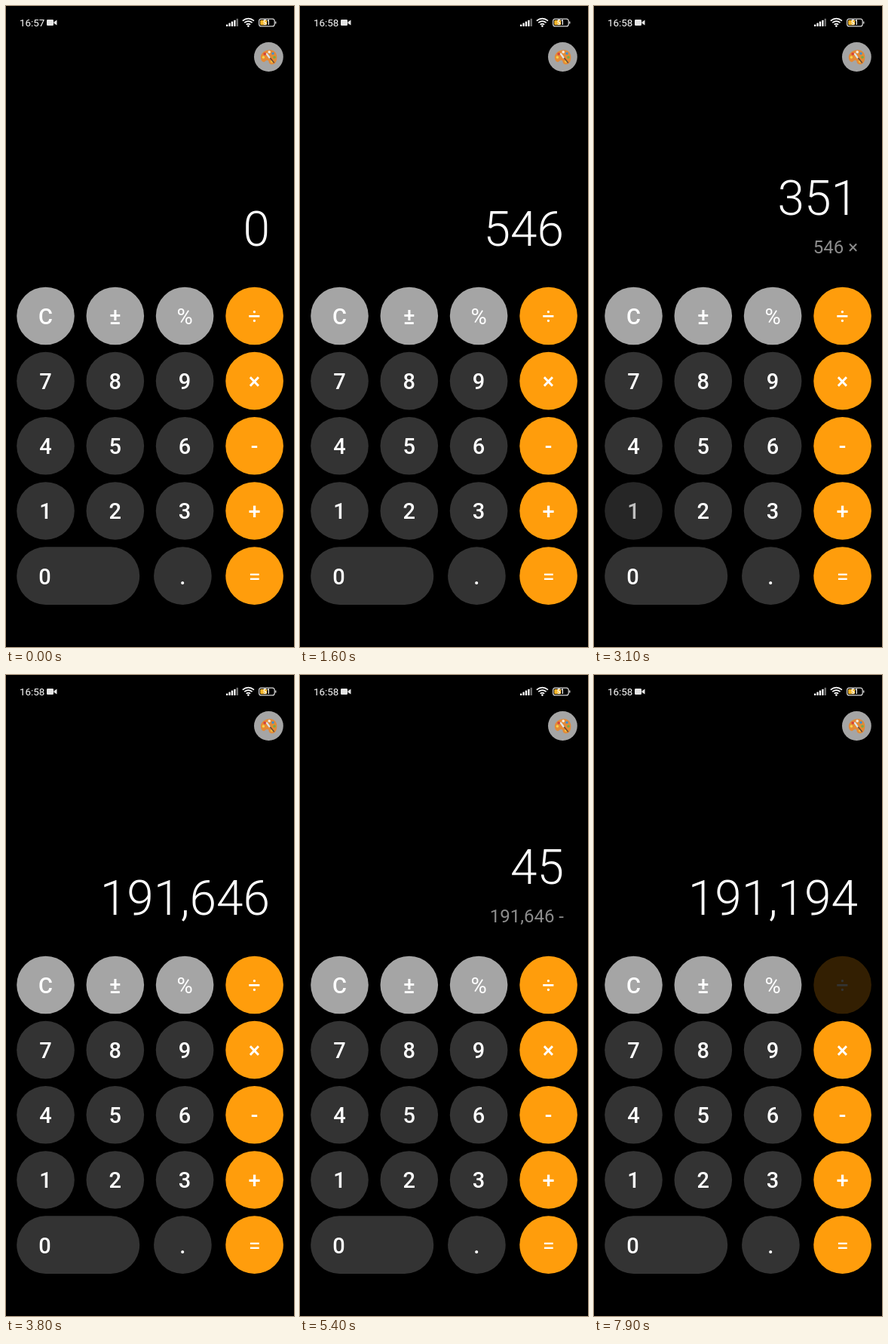
Recreate the animation shown at these times as an HTML page. Size 382x850 px, loop 8 s.

```html
<!DOCTYPE html>
<html lang="en">
<head>
<meta charset="utf-8">
<title>Calculator</title>
<style>
  html, body { margin: 0; width: 100%; height: 100%; overflow: hidden; background: #000; }
  svg { display: block; width: 100%; height: 100%; }
  text { font-family: Roboto, "Noto Sans", sans-serif; fill: #fff; }
  .key { font-size: 29px; font-weight: 500; text-anchor: middle; }
  .thin { font-weight: 400; }
  #main { font-size: 64px; font-weight: 300; text-anchor: end; }
  #sub { font-size: 24px; text-anchor: end; fill: #8c8c8c; }
</style>
</head>
<body>
<svg viewBox="0 0 382 850">
  <rect width="382" height="850" fill="#000"/>

  <text id="clock" x="18" y="27" font-size="13.4"></text>
  <g fill="#e4e4e4">
    <rect x="54" y="18" width="9" height="8" rx="1.2"/>
    <path d="M63.5 21.2 67.5 18.6V25.6L63.5 23Z"/>
  </g>
  <g id="signal" fill="#fff"></g>
  <g fill="none" stroke="#fff" stroke-width="1.7">
    <path d="M313.8 19.6Q321.4 13.6 329 19.6M316.2 22.2Q321.4 18.2 326.6 22.2M318.6 24.6Q321.4 22.6 324.2 24.6"/>
  </g>
  <circle cx="321.4" cy="26.6" r="1.3" fill="#fff"/>
  <rect x="335.6" y="17.1" width="20.6" height="9.8" rx="3" fill="none" stroke="#d8d8d8" stroke-width="1.2"/>
  <rect x="337.2" y="18.7" width="9" height="6.6" rx="1.4" fill="#f5b62b"/>
  <path d="M357.8 20.4V23.6" stroke="#d8d8d8" stroke-width="1.3"/>
  <text x="345.8" y="25" font-size="8.2" font-weight="700" text-anchor="middle">51</text>

  <circle cx="348.4" cy="67.5" r="19.4" fill="#a5a5a5"/>
  <g transform="translate(348.4 68)">
    <path fill="#e58a35" d="M-10.5 1C-11.5-6-3-11 4-9.5C10-8 12-2 10.5 4C9 9.5 4 10.5 1.5 8.5C-.5 7 1 4.5-1.5 4C-4 3.5-5 7-7.5 6C-9.5 5.2-10.2 3.2-10.5 1Z"/>
    <g id="paints"></g>
    <path d="M-2-4 7 7" stroke="#6b4b3c" stroke-width="1.6" stroke-linecap="round"/>
    <path d="M-2.4-4.4 1 .2" stroke="#dfe6ea" stroke-width="2.4" stroke-linecap="round"/>
  </g>

  <text id="main" x="350"></text>
  <text id="sub" x="350" y="328"></text>
  <g id="keys"></g>
</svg>
<script>
const LOOP = 8000, DIM = 0.2, FADE = 250;
const GREY = '#a5a5a5', DARK = '#333333', ORANGE = '#ff9d0c';
const $ = id => document.getElementById(id);

function add(parent, tag, attrs, text) {
  const el = document.createElementNS('http://www.w3.org/2000/svg', tag);
  for (const k in attrs) el.setAttribute(k, attrs[k]);
  if (text) el.textContent = text;
  parent.appendChild(el);
  return el;
}

for (let i = 0; i < 5; i++) {
  const h = 2.6 + i * 1.9;
  add($('signal'), 'rect', { x: 292 + i * 3.4, y: 27 - h, width: 2.3, height: h, rx: 0.6, opacity: i < 4 ? 1 : 0.45 });
}
[[-7, 0, '#f7d34a'], [-5.2, -4.4, '#d8433b'], [0.8, -7, '#f4f0e6'], [5.6, -5, '#3f8fd0'], [7.6, 0, '#6fae4b'], [4.4, 5.6, '#f7c43a']]
  .forEach(([cx, cy, fill]) => add($('paints'), 'circle', { cx, cy, r: 1.8, fill }));

// Keypad
const keys = {};
const columns = [52.5, 144.8, 237.1, 329.6];
['C±%÷', '789×', '456-', '123+', '0 .='].forEach((row, r) => [...row].forEach((label, c) => {
  if (label === ' ') return;
  const x = label === '.' ? 234.4 : columns[c], y = 411 + r * 86.15;
  const fill = c === 3 ? ORANGE : r === 0 ? GREY : DARK;
  const g = keys[label] = add($('keys'), 'g', {});
  add(g, 'rect', { x: x - 38.3, y: y - 38.3, width: label === '0' ? 163 : 76.6, height: 76.6, rx: 38.3, fill });
  add(g, 'text', { x: label === '0' ? 51.6 : x, y: y + 11, class: '=÷%'.includes(label) ? 'key thin' : 'key' }, label);
}));

// Taps: key, finger down, finger up
const taps = [
  ['5', 310, 400], ['4', 810, 900], ['6', 1250, 1340],
  ['×', 1710, 1790], ['3', 2060, 2140], ['5', 2360, 2440], ['1', 2860, 2950], ['=', 3390, 3530],
  ['-', 4510, 4580], ['4', 4810, 4890], ['5', 5110, 5190], ['2', 5410, 5490], ['=', 5910, 6040],
  ['÷', 7850, 8100]
];

const ease = p => p < 0.5 ? 2 * p * p : 1 - 2 * (1 - p) * (1 - p);
const group = n => Number(n).toLocaleString('en-US');

function opacity(t, down, up) {
  if (t < down || t >= up + FADE) return 1;
  return t < up ? DIM : DIM + (1 - DIM) * ease((t - up) / FADE);
}

// Replays every tap that has taken effect by time t
function calculate(t) {
  let value = '0', stored = '', op = '', fresh = true;
  for (const [key, , up] of taps) {
    if (t < up + (key === '=' ? 130 : 50)) break;
    if (key >= '0' && key <= '9') {
      value = fresh ? key : value + key;
      fresh = false;
    } else {
      if (key === '=') {
        value = String(op === '×' ? stored * value : stored - value);
        op = '';
      } else {
        stored = value;
        op = key;
      }
      fresh = true;
    }
  }
  return { main: group(value), sub: op && `${group(stored)} ${op}` };
}

function draw(t) {
  for (const k in keys) {
    const level = taps.reduce((v, [key, down, up]) => key === k ? Math.min(v, opacity(t, down, up)) : v, 1);
    keys[k].setAttribute('opacity', level);
  }
  const { main, sub } = calculate(t);
  $('main').textContent = main;
  $('main').setAttribute('y', sub ? 276.5 : 317.5);
  $('sub').textContent = sub;
  $('clock').textContent = t < 400 ? '16:57' : '16:58';
}

const start = performance.now();
function frame() {
  draw((performance.now() - start) % LOOP);
  requestAnimationFrame(frame);
}
frame();
</script>
</body>
</html>
```
